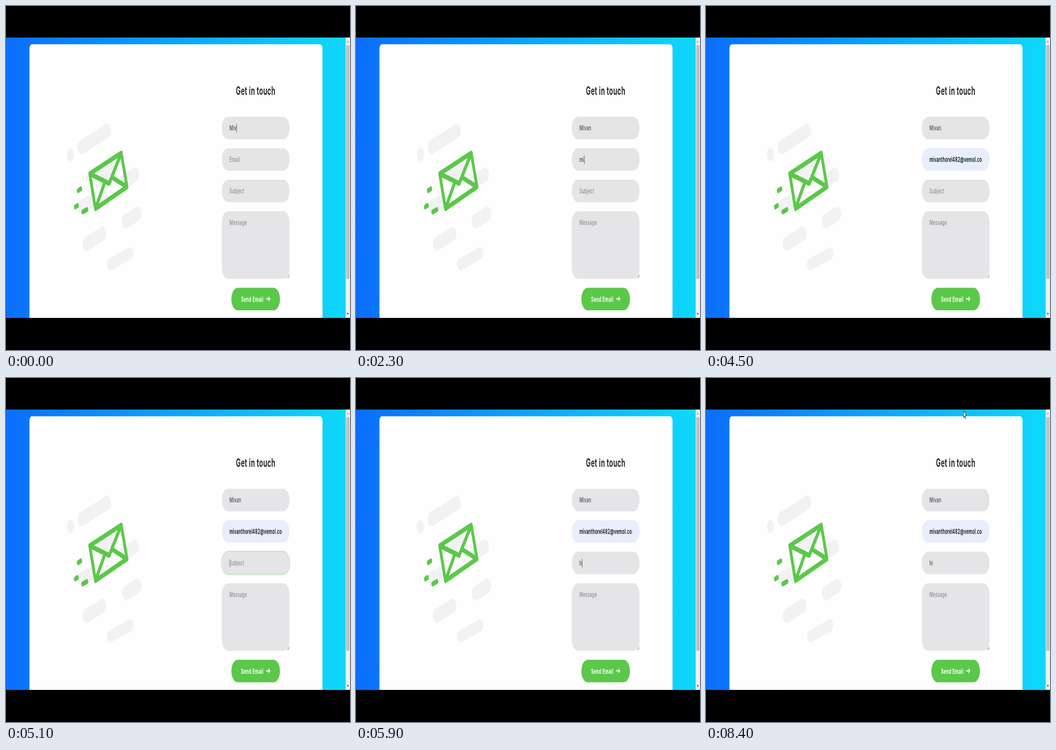
Write an HTML page that moves like this. It is 600 by 600 pixels and loops after 9 s.

```html
<!DOCTYPE html>
<html lang="en">
<head>
<meta charset="utf-8">
<title>Contact form</title>
<style>
  html, body { margin: 0; width: 100%; height: 100%; overflow: hidden; background: #000; }
  /* A wide browser page squeezed into the square stage */
  #page {
    position: absolute; left: 0; top: 54.5px; width: 1366px; height: 623px; overflow: hidden;
    transform: scale(.4392, .785); transform-origin: 0 0;
    background: linear-gradient(to right, #0a6efb, #10d8fb 1349px);
    font: 600 15px/51px Inter, sans-serif; letter-spacing: .5px; white-space: pre;
  }
  #page > * { position: absolute; }
  .card { left: 93px; top: 15px; width: 1164px; height: 700px; border-radius: 10px; background: #fefefe; }
  h1 {
    left: 857px; top: 104px; width: 269px; margin: 0; text-align: center;
    font: 700 25px/30px Inter, sans-serif; letter-spacing: .8px; color: #26282b;
  }
  .field {
    left: 857.3px; width: 208.7px; height: 50px; padding: 0 30px;
    border-radius: 25px; background: #e5e4e6; color: #5c5c5e;
  }
  .field div { height: 100%; overflow: hidden; }
  .hint { color: #98979a; }
  .filled { background: #e8eefb; color: #111; }
  .wrong u { text-decoration: underline 2px #c0393f; text-underline-offset: 3px; text-decoration-skip-ink: none; }
  u { text-decoration: none; }
  i { display: inline-block; width: 2px; height: 19px; margin-right: -2px; vertical-align: -4px; background: #666; }
  .button {
    left: 894.8px; top: 555.5px; width: 154.5px; height: 50px; padding-left: 39px;
    border-radius: 25px; background: #5bc84a; color: #fff; font-weight: 700; letter-spacing: .8px;
  }
  .bar { left: 1349px; top: 0; width: 17px; height: 623px; background: #f1f1f1; }
  .thumb { left: 1351px; top: 17px; width: 13px; height: 519px; background: #c1c1c1; }
  svg { left: 0; top: 0; fill: none; stroke-linecap: round; stroke-linejoin: round; }
</style>
</head>
<body>
<div id="page">
  <div class="card"></div>
  <h1>Get in touch</h1>
  <div class="field" style="top:176.3px"></div>
  <div class="field" style="top:246.3px"></div>
  <div class="field" style="top:316.3px"></div>
  <div class="field hint" style="top:386.3px; height:150px"><div>Message</div></div>
  <div class="button">Send Email</div>
  <div class="bar"></div>
  <div class="thumb"></div>
  <svg width="1366" height="623">
    <g stroke="#f2f1f4" stroke-width="32">
      <path d="M300.5 243.3L400.7 207.6M376 304L414 290M467 320.4L512 305M300.6 376.5L332 366.3
               M476 407.7L521.4 391.8M321 458L382.5 436.3"/>
      <path d="M414.4 504L492 479.7" stroke-width="27"/>
      <circle cx="256" cy="260" r="14.5" fill="#f2f1f4" stroke="none"/>
    </g>
    <g stroke="#5bc84a" stroke-width="11">
      <path d="M332.4 302.6L457.7 256.7L480.4 331.9L355.2 380.3ZL409.9 324.2L457.7 256.7
               M355.2 380.3L391.6 323M480.4 331.9L423.5 311.5"/>
      <path d="M287 340.2L297 336.3M275.5 376.5L283.5 373.3M305 387.3L321 382.2"/>
    </g>
    <path d="M1034 580.5H1047M1043 576.5L1048 580.5L1043 584.5" stroke="#fff" stroke-width="2.6"/>
    <path d="M1117 534L1125 526M1121.5 534L1125 530.5" stroke="#8a898c" stroke-width="1.3"/>
    <path d="M1353.5 11L1357.5 6.5L1361.5 11Z" fill="#a3a3a3"/>
    <path d="M1353.5 612L1357.5 616.5L1361.5 612Z" fill="#505050"/>
    <path id="pointer" d="M0 0V16L3.8 12.6L6.3 18.2L8.8 17.1L6.3 11.6H11.5Z"
          fill="#fff" stroke="#222" stroke-width="1.3"/>
  </svg>
</div>
<script>
const LOOP = 9000, STEP = 100;
const boxes = [...document.querySelectorAll('.field')].slice(0, 3);
const pointer = document.getElementById('pointer');

// Each entry: start time, text, caret shown
const fields = [
  { hint: 'Name', keys: [[0, 'Miv', 1], [100, 'Miva', 1], [300, 'Mivan', 1], [900, 'Mivan', 0]] },
  { hint: 'Email', focus: 1300, keys: [
    [0, '', 0], [1300, '', 1], [1800, '', 0], [2100, 'm', 1], [2300, 'mi', 1], [2400, 'miv', 1],
    [2500, 'miva', 1], [2600, 'mivan', 1], [3100, 'mivan', 0], [3600, 'mivan', 1],
    [4100, 'mivanthorel482@vemol.com', 0]] },
  { hint: 'Subject', focus: 5040, keys: [
    [0, '', 0], [5000, '', 1], [5500, '', 0], [5900, 'h', 1], [6200, 'hi', 1], [6700, 'hi', 0],
    [7200, 'hi', 1], [7800, 'hi', 0], [8300, 'hi', 1], [8400, 'hi', 0]] },
];

const clamp = v => Math.min(1, Math.max(0, v));
const ease = v => v * v * (3 - 2 * v);

function glow(t, start) {
  const p = (t - start) / 500;
  if (!(p > 0 && p < 1)) return 'none';
  const e = ease(p);
  return `0 0 ${80 * e}px ${30 * e}px rgba(91,201,74,${.6 * (1 - e)})`;
}

function drawField({ hint, focus, keys }, box, t) {
  const [, text, caret] = keys.findLast(k => k[0] <= t);
  const bar = caret ? '<i></i>' : '';
  box.innerHTML = `<div>${text ? `<u>${text}</u>${bar}` : bar + hint}</div>`;
  box.classList.toggle('hint', !text);
  box.style.boxShadow = glow(t, focus);
}

function draw(now) {
  const t = Math.floor(now % LOOP / STEP) * STEP;
  fields.forEach((f, n) => drawField(f, boxes[n], t));
  boxes[1].classList.toggle('wrong', t >= 3600 && t < 4100);
  boxes[1].classList.toggle('filled', t >= 4100);

  const left = 1 - ease(clamp((t - 6600) / 600));
  pointer.style.display = t < 6700 ? 'none' : '';
  pointer.setAttribute('transform', `translate(${1023 + 180 * left} ${2 + 95 * left})`);
}

const begin = performance.now();
function tick() {
  draw(performance.now() - begin);
  requestAnimationFrame(tick);
}
tick();
</script>
</body>
</html>
```
